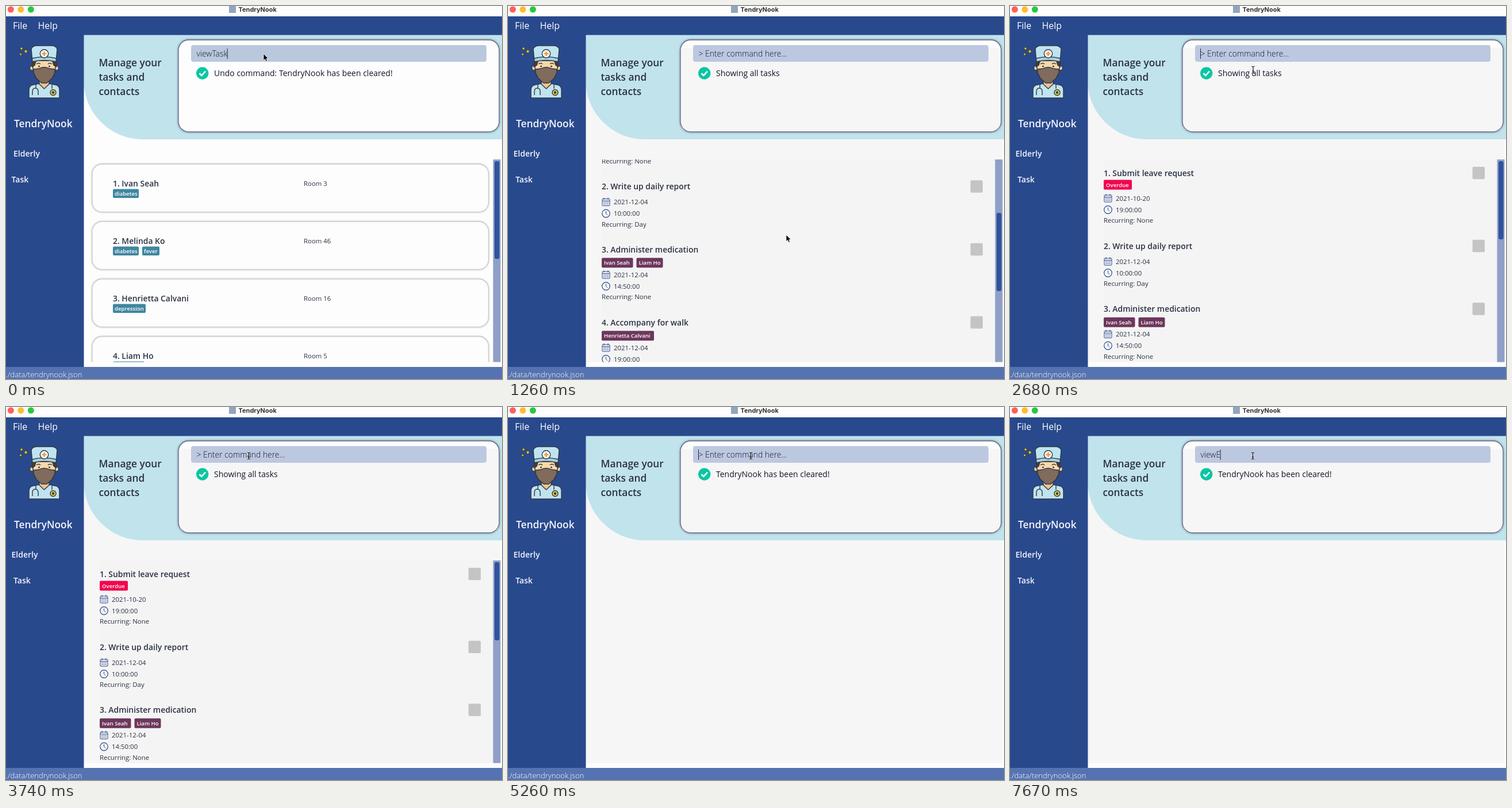
Animation of 863x649 px, one loop 8000 ms. Source, as an HTML page:

```html
<!DOCTYPE html>
<html lang="en">
<head>
<meta charset="utf-8">
<title>Care desk</title>
<style>
  html, body { margin: 0; width: 100%; height: 100%; overflow: hidden; background: #fdfdfd; }
  svg { display: block; width: 863px; height: 649px; font-family: "Open Sans", sans-serif; }
</style>
</head>
<body>
<svg id="stage" viewBox="0 0 863 649"></svg>
<script>
const INK = '#2b3144', NAVY = '#29498d', LOOP = 8000;
const people = ['Ivan Seah', 'Melinda Ko', 'Henrietta Calvani', 'Liam Ho'];

const text = (x, y, s, size = 14, weight = 400, fill = INK, extra = '') =>
  `<text x="${x}" y="${y}" font-size="${size}" font-weight="${weight}" fill="${fill}" ${extra}>${s}</text>`;
const rect = (x, y, w, h, fill, r = 0, extra = '') =>
  `<rect x="${x}" y="${y}" width="${w}" height="${h}" rx="${r}" fill="${fill}" ${extra}/>`;
const circle = (x, y, r, fill, extra = '') =>
  `<circle cx="${x}" cy="${y}" r="${r}" fill="${fill}" ${extra}/>`;
const path = (d, extra) => `<path d="${d}" ${extra}/>`;

function person(i, room, tags) {
  const y = 275 + i * 100;
  let x = 186;
  return rect(147.5, y - 2.5, 694.5, 88.5, '#ebebeb', 20) +
    rect(150, y, 689.5, 83.5, '#fdfdfd', 17, 'stroke="#cacaca" stroke-width="1.4"') +
    text(186, y + 39, `${i + 1}. ${people[i]}`, 13.9, 600) +
    text(518, y + 38.3, `Room ${room}`, 11.4) +
    tags.map(([name, w]) => {
      const tag = rect(x, y + 43.5, w, 15.5, '#3f86a0', 2) + text(x + 3, y + 54.6, name, 9.6, 600, '#fff');
      x += w + 6;
      return tag;
    }).join('');
}

const calendar = y => `<g transform="translate(163.5 ${y - 7.5})" fill="none" stroke="${NAVY}">` +
  rect(.5, 2, 13, 12, 'none', 1) + path('M.5 5.5H13.5M3.5 0V3.5M10.5 0V3.5', '') +
  path('M3 8H12M3 11H12', 'stroke-dasharray="1.6 1.6" stroke-width="1.6"') + '</g>';
const clock = y => circle(170.5, y, 6.8, 'none', `stroke="${NAVY}" stroke-width="1.2"`) +
  path(`M170.5 ${y - 4}V${y}L173 ${y + 2.5}`, `fill="none" stroke="${NAVY}"`);

function task(n, y, title, tags, date, time, recurring) {
  const late = tags[0] && tags[0][0] === 'Overdue';
  const top = y + (late ? 12 : 14.7), d = y + (tags.length ? 44 : 27);
  let x = 163;
  return text(163, y + 5, `${n}. ${title}`, 13.9, 600) +
    rect(804.7, y - 10.8, 21.3, 21.6, '#c4c4c4', 2) +
    tags.map(([name, w]) => {
      const tag = rect(x, top, w, 17, late ? '#f2054e' : '#6d375c', 2) +
        text(x + 4, top + 12, name, 9.6, 600, '#fff');
      x += w + 6;
      return tag;
    }).join('') +
    calendar(d) + text(184, d + 4.2, date, 11.4) +
    clock(d + 20) + text(184, d + 24.2, time, 11.4) +
    text(163, d + 42.5, `Recurring: ${recurring}`, 11.4);
}

const sparkle = (x, y, r) => path(
  `M${x} ${y - r}L${x + r * .35} ${y - r * .35}L${x + r} ${y}L${x + r * .35} ${y + r * .35}L${x} ${y + r}` +
  `L${x - r * .35} ${y + r * .35}L${x - r} ${y}L${x - r * .35} ${y - r * .35}Z`, 'fill="#e2c534" stroke="#39402f" stroke-width=".9"');

const nurse = sparkle(27, 74, 3.4) + sparkle(34.5, 79, 4) + sparkle(25.5, 84, 3) +
  '<g stroke="#303946" stroke-width="1.4" stroke-linejoin="round">' +
  path('M40 160V146Q40 138 48 137L58 135H75L85 137Q93 138 93 146V160Z', 'fill="#c0e4ef"') +
  path('M58 128V136L66.5 144L75 136V128Z', 'fill="#eec391"') +
  circle(45.5, 108, 4, '#f4cf9d') + circle(87.5, 108, 4, '#f4cf9d') +
  path('M47 95V110Q48 125 59 131Q66.5 135 74 131Q85 125 86 110V95Z', 'fill="#f8d8a9"') +
  path('M45.5 96V106L50 103L52 96ZM87.5 96V106L83 103L81 96Z', 'fill="#4b3b34"') +
  path('M48 110L57 109Q66.5 104 76 109L85 110V116L80 126L71 134H62L53 126L48 116Z', 'fill="#806b5d"') +
  path('M53 101Q57 98 60 101M73 101Q76 98 80 101', 'fill="none"') +
  circle(57.5, 105, .8, '#303946') + circle(75.5, 105, .8, '#303946') +
  path('M44 75Q46 69 54 69H79Q87 69 89 75L87 97Q66.5 92 46 97Z', 'fill="#c0e4ef"') +
  path('M45.5 91Q66.5 86 87.5 91L87 97Q66.5 92 46 97Z', 'fill="#a3d1e1"') +
  circle(66.5, 83, 7.2, '#fff') +
  path('M66.5 79V87M62.5 83H70.5', 'stroke="#ec9c43" stroke-width="2.6"') +
  path('M52 137V143M46 155V149Q46 143 51 143Q56 143 56 149V155M80 137V144', 'fill="none" stroke="#303946"') +
  circle(82, 150.5, 5, '#e8cf40') + circle(82, 150.5, 1.5, '#303946') + '</g>';

const stage = document.getElementById('stage');
stage.innerHTML =
  `<clipPath id="list">${rect(136, 267, 727, 352.5, '#000')}</clipPath>` +
  rect(0, 0, 863, 649, '#fdfdfd') +
  `<g id="grey">${rect(135, 73, 725, 547, '#f6f6f6')}</g>` +
  // title bar
  circle(8.3, 6, 5.5, '#ff5f57') + circle(25.8, 6, 5.5, '#febc2e') + circle(43.3, 6, 5.5, '#28c840') +
  rect(388, 0, 12, 12, '#92a5bf') +
  text(404.5, 10, 'TendryNook', 11, 700, '#333', 'font-family="Inter, sans-serif"') +
  // hero
  path('M135 50H863V232H238A103 103 0 0 1 135 129Z', 'fill="#c1e3ec"') +
  ['Manage your', 'tasks and', 'contacts'].map((s, i) => text(161.5, 105 + i * 25, s, 17.3, 600)).join('') +
  rect(300, 59, 558, 160, '#fdfdfd', 18, 'style="filter:drop-shadow(0 0 2px #4b5675)"') +
  `<g id="panel">${path('M300 73H858V201Q858 219 840 219H318Q300 219 300 201Z', 'fill="#f6f6f6"')}</g>` +
  rect(300, 59, 558, 160, 'none', 18, 'stroke="#646d88" stroke-width="1.3"') +
  rect(322, 68, 514, 29, '#b9c8dc', 4, 'id="field"') +
  text(331.5, 88, '', 13.9, 300, '#10162a', 'id="input"') +
  rect(0, 74, 1, 18, '#20283a', 0, 'id="caret"') +
  circle(341.7, 117, 10.7, '#0bc6a2') +
  path('M336.5 117.3L340.3 121L347 113.6', 'fill="none" stroke="#fff" stroke-width="2.6"') +
  text(362, 122, '', 14, 400, '#12172a', 'id="reply"') +
  // lists
  '<g clip-path="url(#list)"><g id="elderly">' +
  person(0, 3, [['diabetes', 45]]) + person(1, 46, [['diabetes', 45], ['fever', 30]]) +
  person(2, 16, [['depression', 57]]) + person(3, 5, [['depression', 55]]) + '</g>' +
  `<g id="tasks">${rect(163, 267, 685, 353, '#f4f4f4')}<g id="rows">` +
  task(1, 290.5, 'Submit leave request', [['Overdue', 49]], '2021-10-20', '19:00:00', 'None') +
  task(2, 417.5, 'Write up daily report', [], '2021-12-04', '10:00:00', 'Day') +
  task(3, 527, 'Administer medication', [[people[0], 54.5], [people[3], 46]], '2021-12-04', '14:50:00', 'None') +
  task(4, 654, 'Accompany for walk', [[people[2], 91]], '2021-12-04', '19:00:00', 'Day') +
  task(5, 780.5, 'Clean working area', [], '2021-12-13', '11:00:00', 'Week') + '</g></g>' +
  `<g id="bar">${rect(847.5, 267, 13, 353, '#909fc6')}${rect(850, 270, 8.5, 170, '#30529c', 3, 'id="thumb"')}</g></g>` +
  // sidebar, menu and status bar
  rect(0, 18, 863, 32.5, NAVY) + rect(0, 18, 135.5, 611, NAVY) +
  text(12, 40, 'File', 16, 400, '#fff') + text(55.5, 40, 'Help', 16, 400, '#fff') +
  nurse + text(14, 211, 'TendryNook', 17.3, 600, '#f3f5fa') +
  text(13, 262, 'Elderly', 14, 600, '#f3f5fa', 'id="tabElderly"') +
  text(10, 307.3, 'Task', 14, 600, '#f3f5fa', 'id="tabTask"') +
  rect(0, 628, 863, 21, '#5673b1') +
  text(0, 646, './data/tendrynook.json', 13, 300, '#fff') +
  // pointer
  '<g id="pointer">' +
  path('M0 0V11.6L2.6 9.3L4.4 13.2L6.5 12.3L4.8 8.5H8.2Z', 'id="arrow" fill="#000" stroke="#fff" stroke-width=".8"') +
  '<g id="beam" fill="none">' +
  ['stroke="#fff" stroke-opacity=".6" stroke-width="2.6"', 'stroke="#000" stroke-width="1.1"']
    .map(s => path('M-2.7-6Q-.3-6 0-4.5Q.3-6 2.7-6M0-5V5M-2.7 6Q-.3 6 0 4.5Q.3 6 2.7 6M-1.5 2H1.5', s)).join('') +
  '</g></g>';

// timelines: [start in ms, values...]
const typed = [[0, 'viewTask'], [90, 'viewTasks'], [540, ''], [4540, 'c'], [4630, 'cl'], [4720, 'cle'],
  [4900, 'clea'], [4990, 'clear'], [5260, ''], [6430, 'v'], [6520, 'vi'], [6610, 'vie'], [6690, 'view'],
  [7050, 'viewE'], [7500, 'view'], [7670, 'viewE']];
const caretOff = [[810, 1340], [1790, 2330], [2770, 3300], [3740, 4280], [5800, 6250]];
const scroll = [[0, 0, 270], [1260, 103.5, 360], [1340, 247, 481], [1790, 242, 475], [1880, 221.2, 453],
  [1970, 90, 347], [2060, 0, 270]];
const pointer = [[0, 448, 83], [720, 452, 112], [810, 466, 230], [900, 480, 365], [990, 484, 398],
  [2420, 482, 385], [2510, 464, 306], [2600, 427, 146], [2680, 423, 111], [2770, 422.5, 98],
  [2860, 422.5, 91], [2950, 422.5, 87], [3030, 422.5, 85]];

const el = id => document.getElementById(id);
const show = (id, on) => el(id).setAttribute('visibility', on ? 'visible' : 'hidden');
const set = (id, name, value) => el(id).setAttribute(name, value);
const at = (list, t) => list.filter(k => k[0] <= t).pop().slice(1);

function draw(t) {
  const listing = t < 540, cleared = t >= 5260;
  show('elderly', listing);
  show('tasks', !listing && !cleared);
  show('bar', !cleared);
  show('grey', !listing);
  show('panel', !listing);
  set('field', 'fill', listing ? '#b9c8dc' : '#bcc8e0');
  set('tabElderly', 'x', listing ? 13 : 9.5);
  set('tabTask', 'x', listing ? 9.5 : 13);
  el('reply').textContent = listing ? 'Undo command: TendryNook has been cleared!'
    : cleared ? 'TendryNook has been cleared!' : 'Showing all tasks';

  const [entry] = at(typed, t);
  el('input').textContent = entry || '> Enter command here...';
  set('caret', 'x', entry ? 331 + el('input').getComputedTextLength() : 331);
  show('caret', !caretOff.some(([a, b]) => t >= a && t < b));

  const [offset, thumb] = at(scroll, t);
  set('rows', 'transform', `translate(0 ${-offset})`);
  set('thumb', 'y', thumb);
  set('thumb', 'height', listing ? 170 : 136);

  const [x, y] = at(pointer, t), beam = t >= 2600;
  set('pointer', 'transform', `translate(${x} ${y})`);
  show('arrow', !beam);
  show('beam', beam);
}

const start = performance.now();
function tick() {
  draw((performance.now() - start) % LOOP);
  requestAnimationFrame(tick);
}
tick();
</script>
</body>
</html>
```
